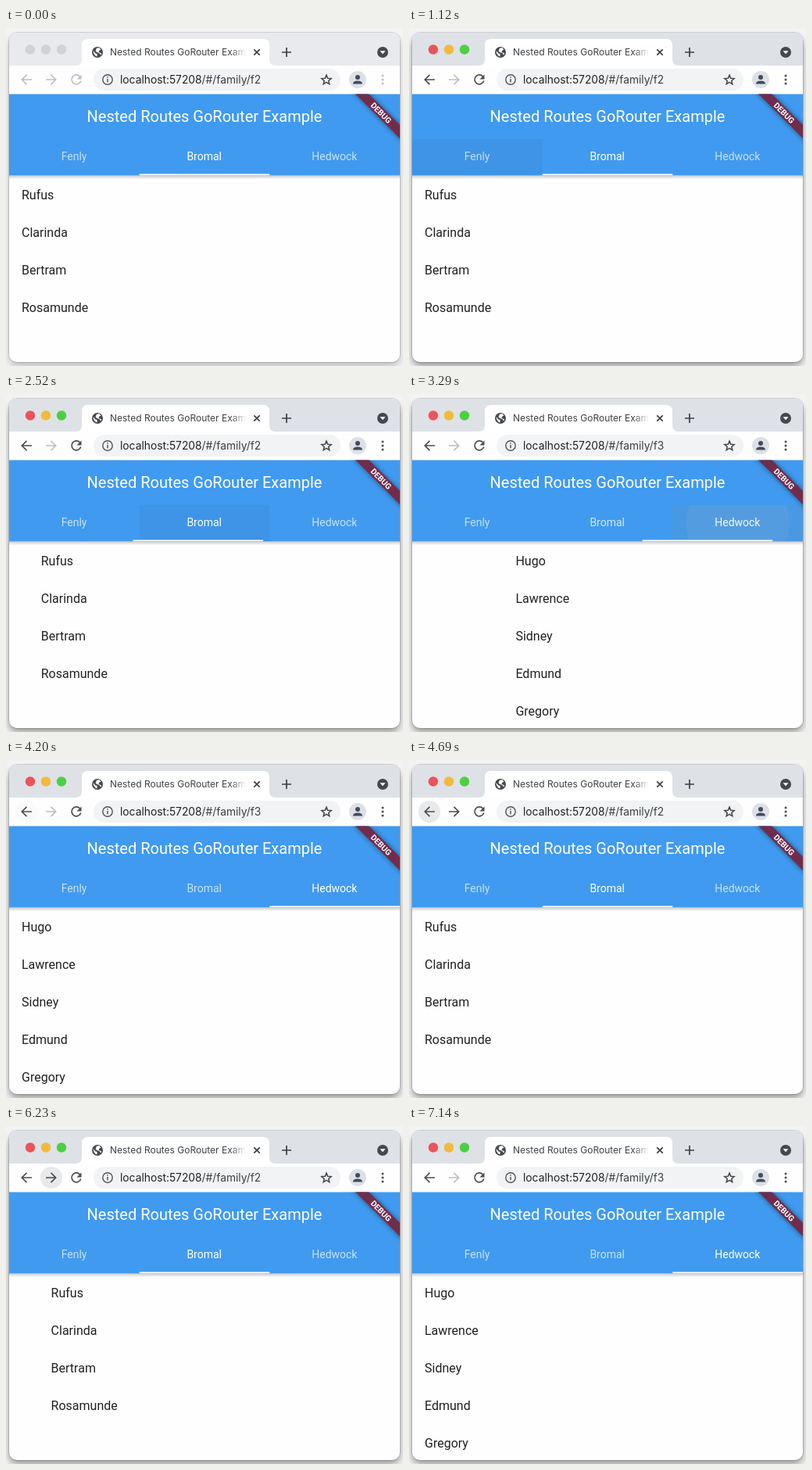
An HTML page that plays this animation: 508 by 432 pixels, repeating every 8750 ms.

```html
<!DOCTYPE html>
<html lang="en">
<head>
<meta charset="utf-8">
<title>Nested routes demo</title>
<style>
  html, body { margin: 0; width: 100%; height: 100%; overflow: hidden; background: #eee; }
  svg { display: block; width: 508px; height: 432px; --ink: #4a4d51; --strip: #dee1e6; --shade: .38; }
  svg.idle { --ink: #bcbfc3; --strip: #e8eaed; --shade: .22; }
  text { font-family: Roboto, sans-serif; }
  .ui { font-family: Inter, sans-serif; }
  .icon { fill: none; stroke: var(--ink); stroke-width: 1.7; }
  .dots { fill: var(--ink); }
  .strip { fill: var(--strip); }
  .shade { opacity: var(--shade); }
  .idle .light { fill: #d0d2d5; }
  .tab { font-size: 14px; fill: #fff; text-anchor: middle; }
  .row { font-size: 16px; fill: #212121; }
</style>
</head>
<body>
<svg id="stage" viewBox="0 0 508 432">
  <defs>
    <clipPath id="window"><rect x="4" y="6" width="500" height="421" rx="10"/></clipPath>
    <clipPath id="bar"><rect x="4" y="84.5" width="500" height="104"/></clipPath>
    <clipPath id="ink"><rect id="inkBox" y="142" width="166.67" height="47"/></clipPath>
    <linearGradient id="fade" gradientUnits="userSpaceOnUse" x1="288" x2="307" y1="0" y2="0">
      <stop stop-color="#3c4043"/><stop offset="1" stop-color="#3c4043" stop-opacity="0"/>
    </linearGradient>
    <linearGradient id="drop" x2="0" y2="1">
      <stop stop-opacity=".2"/><stop offset="1" stop-opacity="0"/>
    </linearGradient>
    <filter id="blur" x="-20%" y="-80%" width="140%" height="260%"><feGaussianBlur stdDeviation="3"/></filter>
    <filter id="haze"><feGaussianBlur stdDeviation="5"/></filter>
  </defs>

  <rect width="508" height="432" fill="#f3f3f4"/>
  <rect class="shade" x="4" y="13" width="500" height="419" rx="10" filter="url(#haze)"/>
  <rect x="3.5" y="5.5" width="501" height="422" rx="10.5" fill="none" stroke="#000" stroke-opacity=".14"/>
  <g clip-path="url(#window)">
    <rect width="508" height="432" fill="#fefefe"/>
    <rect class="strip" width="508" height="48"/>
    <path d="M89 48q8 0 8-8V22q0-8 8-8H329q8 0 8 8V40q0 8 8 8z" fill="#fff"/>
    <circle class="light" cx="31" cy="27.5" r="6.2" fill="#ec5359"/>
    <circle class="light" cx="51" cy="27.5" r="6.2" fill="#f3b93b"/>
    <circle class="light" cx="71" cy="27.5" r="6.2" fill="#4bd043"/>

    <circle cx="117" cy="31" r="7" fill="#45494d"/>
    <path d="M111.5 29l3 3.5 2 .5v3.5q-4.5-1.5-5-7.5zM116 25.8l3.5-.5 2 2.5-2 .7-1 2.5 3.5 1.2-.5 2.5-2-2.5-3.500-1.500-1.500-1.500z" fill="#fff"/>
    <text class="ui" x="133" y="35.3" font-size="12" fill="url(#fade)">Nested Routes GoRouter Example</text>
    <path d="M317.3 27.3l7.4 7.4m0-7.4l-7.4 7.4" fill="none" stroke="#3c4043" stroke-width="1.7"/>
    <path d="M353 31h12M359 25v12" fill="none" stroke="#3c4043" stroke-width="1.7"/>
    <circle cx="482" cy="31" r="7" fill="#45494d"/>
    <path d="M478.5 29.3h7l-3.5 4z" fill="#fff"/>

    <circle id="halo" cy="66" r="14"/>
    <path id="prev" class="icon" d="M33 66H20.5M26.5 59.8L20.3 66l6.2 6.2"/>
    <path id="next" class="icon" d="M51 66h12.5M57.5 59.8l6.2 6.2-6.2 6.2"/>
    <path class="icon" d="M94.5 61.8A6 6 0 1 0 95.8 67.5"/>
    <path class="dots" d="M96.5 59.5v6h-6z"/>

    <rect x="112" y="52" width="316" height="28" rx="14" fill="#f1f3f4"/>
    <circle cx="130" cy="66" r="6.2" fill="none" stroke="#505459" stroke-width="1.4"/>
    <path d="M130 65v4.3M130 62.3v1.5" stroke="#505459" stroke-width="1.5"/>
    <text class="ui" x="146" y="71" font-size="13.8" fill="#202124">localhost:57208<tspan id="path" fill="#3c4043"></tspan></text>
    <path transform="translate(410 66) scale(.9)" d="M0-6.500l1.900 4.500 4.900.4-3.700 3.200 1.100 4.800-4.200-2.600-4.200 2.600 1.100-4.800-3.700-3.200 4.900-.4z" fill="none" stroke="#45494d" stroke-width="1.700"/>
    <circle cx="450" cy="66" r="11" fill="#dde1e7"/>
    <circle cx="450" cy="63" r="3" fill="#434c5a"/>
    <path d="M444 71.500q0-4 6-4t6 4z" fill="#434c5a"/>
    <g class="dots"><circle cx="482" cy="61" r="1.500"/><circle cx="482" cy="66" r="1.500"/><circle cx="482" cy="71" r="1.500"/></g>

    <g id="pages"></g>

    <rect x="4" y="188.5" width="500" height="5" fill="url(#drop)"/>
    <g clip-path="url(#bar)">
      <rect x="4" y="84" width="500" height="105" fill="#409aef"/>
      <g clip-path="url(#ink)">
        <rect id="hover" x="4" y="142" width="500" height="47" fill="#000"/>
        <rect id="glow" x="4" y="142" width="500" height="47" fill="#bcbcbc"/>
        <circle id="splash" cy="165" fill="#c8c8c8"/>
      </g>
      <text x="254" y="120" font-size="20" fill="#fff" text-anchor="middle">Nested Routes GoRouter Example</text>
      <g id="tabs"></g>
      <rect id="line" y="186.5" width="166.67" height="2" fill="#fff"/>
      <g transform="translate(504 84.5) rotate(45)">
        <rect x="-50" y="28" width="100" height="12" opacity=".5" filter="url(#blur)"/>
        <rect x="-50" y="28" width="100" height="12" fill="#722c4b"/>
        <text y="37.6" font-size="10.2" font-weight="700" fill="#fff" text-anchor="middle">DEBUG</text>
      </g>
    </g>
  </g>
</svg>

<script>
const LOOP = 8750, STEP = 70, WIDTH = 500, TAB = WIDTH / 3, SLIDE = 300;
const families = [
  ['Fenly', ['Derek', 'Mark', 'Ned']],
  ['Bromal', ['Rufus', 'Clarinda', 'Bertram', 'Rosamunde']],
  ['Hedwock', ['Hugo', 'Lawrence', 'Sidney', 'Edmund', 'Gregory']]
];
// Tapped tabs slide the indicator; history buttons make it jump.
const moves = [
  { press: 1330, at: 1470, to: 0, tap: true },
  { press: 2100, at: 2303, to: 1, tap: true },
  { press: 3010, at: 3150, to: 2, tap: true },
  { press: 4270, at: 4350, to: 1 },
  { press: 5040, at: 5330, to: 0 },
  { press: 5950, at: 6030, to: 1 },
  { press: 6720, at: 6800, to: 2 }
];
const hovers = [[1120, 1820, 0], [1820, 3010, 1], [3010, 3500, 2]];

const $ = id => document.getElementById(id);
const clamp = v => Math.max(0, Math.min(1, v));
const set = (el, attrs) => { for (const k in attrs) el.setAttribute(k, attrs[k]); };
const make = (parent, tag, attrs, text = '') => {
  const el = document.createElementNS('http://www.w3.org/2000/svg', tag);
  set(el, attrs);
  el.textContent = text;
  return parent.appendChild(el);
};

// cubic-bezier(.25, .1, .25, 1)
function ease(x) {
  if (x <= 0 || x >= 1) return clamp(x);
  const curve = (s, a, b) => 3 * (1 - s) ** 2 * s * a + 3 * (1 - s) * s * s * b + s ** 3;
  let low = 0, high = 1;
  for (let i = 0; i < 20; i++) {
    const mid = (low + high) / 2;
    if (curve(mid, .25, .25) < x) low = mid; else high = mid;
  }
  return curve(low, .1, 1);
}

const tabs = [], pages = [];
families.forEach(([name, people], i) => {
  tabs.push(make($('tabs'), 'text', { class: 'tab', x: 3.7 + (i + .5) * TAB, y: 169 }, name));
  const page = make($('pages'), 'g', {});
  people.forEach((p, j) => make(page, 'text', { class: 'row', x: 20, y: 218.5 + 48 * j }, p));
  pages.push(page);
});

function drawInk(t) {
  const hover = hovers.find(([a, b]) => t >= a && t < b);
  const tap = moves.find(m => m.tap && t >= m.press && t < m.at + 200);
  const cell = tap ? tap.to : hover ? hover[2] : 0;
  const fade = tap ? 1 - clamp((t - tap.at) / 200) : 0;
  const age = tap ? t - tap.press : 0;
  set($('inkBox'), { x: 4 + cell * TAB });
  set($('hover'), { opacity: hover ? .04 : 0 });
  set($('glow'), { opacity: .3 * fade * clamp(age / 200) });
  set($('splash'), { cx: 4 + (cell + .5) * TAB, r: 10 + age * .2, opacity: .3 * fade });
}

function drawHistory(t) {
  const canGo = t >= 4350 && t < 6800;
  const onNext = t >= 5810;
  const pressed = moves.some(m => !m.tap && t >= m.press && t < m.at + 150);
  set($('halo'), {
    cx: onNext ? 58 : 26,
    fill: pressed ? '#d8dadd' : '#e8e9eb',
    opacity: t < 4200 || t >= 6800 ? 0 : clamp((t - 4160) / 200)
  });
  $('next').style.stroke = canGo ? '' : '#bcbfc3';
}

function draw(t) {
  let index = 1, pos = 1, mark = 1;
  for (const m of moves) {
    if (t < m.at) break;
    pos = index + (m.to - index) * ease((t - m.at) / SLIDE);
    index = m.to;
    mark = m.tap ? pos : index;
  }
  $('stage').classList.toggle('idle', t < 420);
  $('path').textContent = '/#/family/f' + (index + 1);
  pages.forEach((p, i) => set(p, { transform: `translate(${(i - pos) * WIDTH} 0)` }));
  tabs.forEach((el, i) => set(el, { 'fill-opacity': .7 + .3 * clamp(1 - Math.abs(i - mark)) }));
  set($('line'), { x: 4 + mark * TAB });
  drawInk(t);
  drawHistory(t);
}

const start = performance.now();
function tick() {
  const t = (performance.now() - start) % LOOP;
  draw(Math.floor(t / STEP) * STEP);
  requestAnimationFrame(tick);
}
tick();
</script>
</body>
</html>
```
